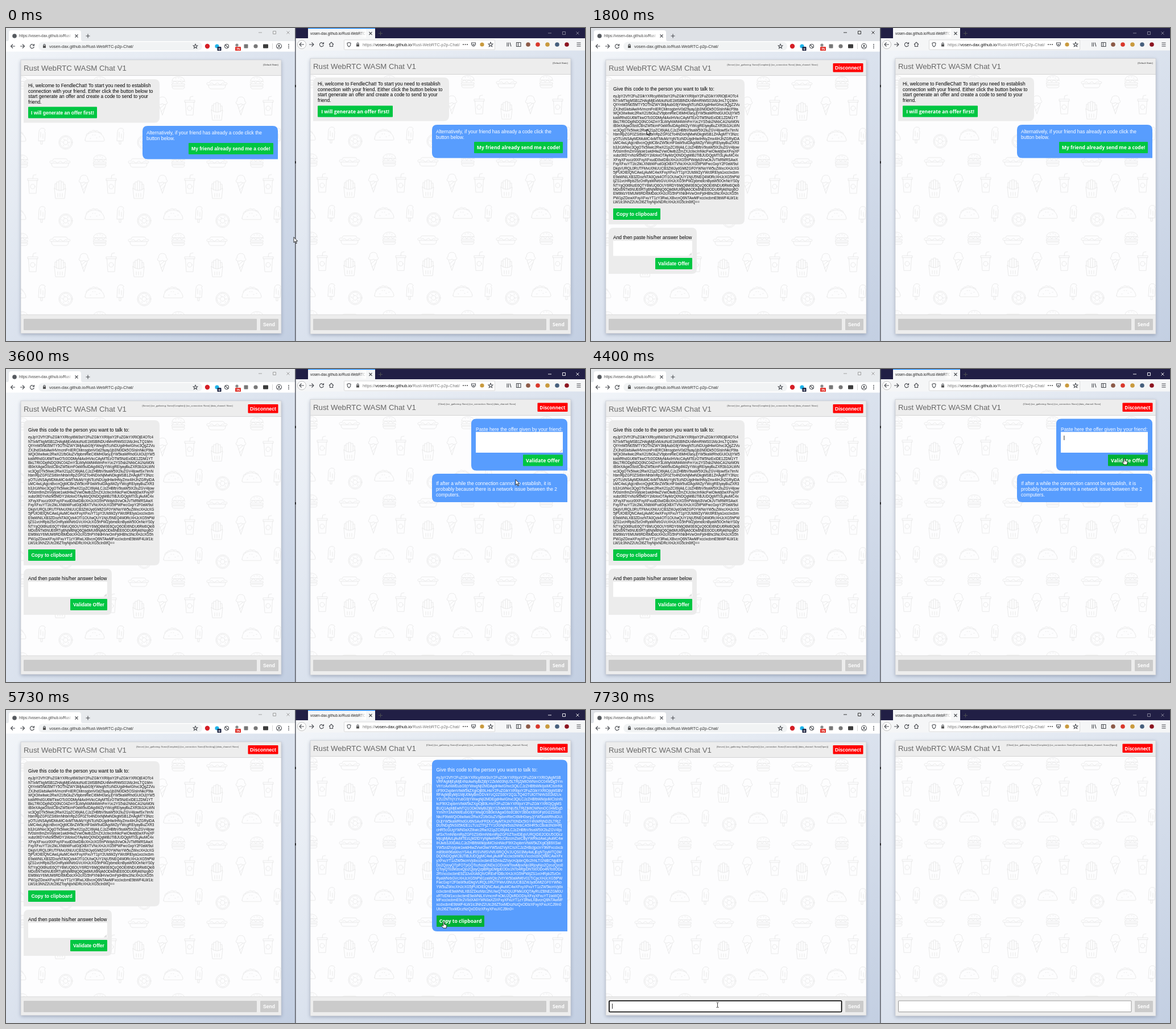
Animation of 1018x550 px, one loop 8000 ms. Source, as an HTML page:

```html
<!DOCTYPE html>
<html lang="en">
<head>
<meta charset="utf-8">
<title>Two browser chat</title>
<style>
html, body { margin: 0; width: 100%; height: 100%; overflow: hidden; background: #fff; }
svg { display: block; width: 1018px; height: 550px; }
text { font-family: "Liberation Sans", Arial, sans-serif; white-space: pre; }
.b { font-weight: 700; }
.fx { font-family: "Open Sans", "Noto Sans", sans-serif; font-weight: 700; }
.mono { font-family: "Liberation Mono", "DejaVu Sans Mono", monospace; }
.food { fill: none; stroke: #e7e7e7; stroke-width: .9; stroke-linejoin: round; stroke-linecap: round; }
.ico { fill: none; stroke: #4a4d52; stroke-width: 1.1; }
</style>
</head>
<body>
<svg id="stage" viewBox="0 0 1018 550" xmlns="http://www.w3.org/2000/svg">
<defs>
  <linearGradient id="page" x1="0" y1="0" x2="1" y2="1">
    <stop offset="0" stop-color="#f2f5f9"/><stop offset="1" stop-color="#c3cfe2"/>
  </linearGradient>
  <linearGradient id="fade"><stop offset="0" stop-color="#fff" stop-opacity="0"/><stop offset="1" stop-color="#fff"/></linearGradient>
  <filter id="soft" x="-10%" y="-10%" width="120%" height="120%"><feGaussianBlur stdDeviation="3"/></filter>
  <g id="burger"><path d="M-11-3C-11-13 11-13 11-3zM-12-1q2 3 4 0t4 0 4 0 4 0 4 0 4 0M-11 2h22v3h-22zM-11 7h22q0 4-4 4H-7q-4 0-4-4zM-5-7h1M0-8h1M4-6h1"/></g>
  <g id="hotdog"><path d="M-14-3q-4-1-4 2t4 2H14q4 0 4-2t-4-2M-13-3q0-4 4-4H9q4 0 4 4M-15 1q0 7 5 7h20q5 0 5-7M-12-1q3-3 5 0t5 0 5 0 5 0 4 0"/></g>
  <g id="cup"><path d="M-9-7v-3H9v3zM-7.500-7l1.500 23H6L7.500-7M0-10l1-6 5-1"/><circle cy="4" r="4"/></g>
  <g id="fries"><path d="M-10-3L-8 15H8l2-18q-10 8-20 0zM-9-2v-9h3v11M-6-11v-3h4v15M-2-14v-2h4v17M2-14h4v14M6-10h3v8M-4 6v6M0 6v6M4 6v6"/></g>
  <g id="cone"><path d="M-8-4q-2-3 1-4 0-8 7-8t7 8q3 1 1 4-4 3-8 0-4 3-8 0zM-6-2L0 16 6-2M-4 4L3-2M-2 10L5 2"/></g>
  <g id="pop"><path d="M-6 8L-5-8q1-6 6-6 4 0 5 3-3 2 0 5L5 8zM-2 8v6h3v-6M-2-7v9M2-4v8"/></g>
  <g id="taco"><path d="M-17 7C-16-12 14-13 17 7q0 2-2 2h-30q-2 0-2-2zM-15-1q0-4 4-4 1-4 5-3 3-4 7-1 4-2 6 2 5 0 5 4M-8 4h1M0-2h1M3 3h1M8 1h1M-4-2h1"/></g>
  <g id="donut"><circle r="12"/><circle r="10"/><circle r="4"/><path d="M-7-2l1 2M-4-6l2 1M3-7l1 2M7-1l-1 2M4 6l1-2M-3 6l-2-1"/></g>
</defs>
</svg>
<script>
const NS = "http://www.w3.org/2000/svg";
const stage = document.getElementById("stage");
const GREEN = "#00c642", DARK = "#00b136", BLUE = "#589dfe", GREY = "#ececec";
const END = 8000;
const timed = [], buttons = [];

function el(tag, attrs, parent = stage, content) {
  const node = document.createElementNS(NS, tag);
  for (const k in attrs) node.setAttribute(k, attrs[k]);
  if (content !== undefined) node.textContent = content;
  parent.appendChild(node);
  return node;
}
const rect = (p, x, y, width, height, fill, more) => el("rect", { x, y, width, height, fill, ...more }, p);
const path = (p, d, more) => el("path", { d, ...more }, p);
const dot = (p, cx, cy, r, fill) => el("circle", { cx, cy, r, fill }, p);
const text = (p, x, y, s, size = 8.45, fill = "#000", more) =>
  el("text", { x, y, "font-size": size, fill, ...more }, p, s);
const icon = (p, d, more) => path(p, d, { class: "ico", ...more });

// A group that is visible only between two times.
function during(from, to, parent) {
  const g = el("g", {}, parent);
  timed.push([g, from, to]);
  return g;
}

function bubble(p, x, y, w, h, own) {
  const r = 9, [br, bl] = own ? [0, r] : [r, 0];
  path(p, `M${x + r} ${y}h${w - 2 * r}q${r} 0 ${r} ${r}v${h - r - br}q0 ${br} ${-br} ${br}h${br + bl - w}` +
    `q${-bl} 0 ${-bl} ${-bl}v${bl + r - h}q0 ${-r} ${r} ${-r}z`, { fill: own ? BLUE : GREY });
}

function paragraph(p, x, y, lines, step, size, fill) {
  lines.forEach((s, i) => text(p, x, y + i * step, s, size, fill));
}

function button(p, x, y, w, label, fox) {
  const box = rect(p, x, y, w, 20, GREEN, { rx: 1 });
  label = text(p, x + w / 2, y + 13, label, fox ? 8.6 : 8.5, "#fff", { class: fox ? "fx" : "b", "text-anchor": "middle" });
  buttons.push({ box, p, x, y, w });
}

function focusRing(p, x, y, w, h) {
  rect(p, x, y, w, h, "none", { stroke: "#000", "stroke-width": 1.6, rx: 1.5 });
}

// ---- session codes ----
const ruler = document.createElement("canvas").getContext("2d");
ruler.font = '63.8px "Liberation Sans", Arial, sans-serif';

function wrap(s, width) {
  const lines = [""];
  for (const c of s) {
    if (ruler.measureText(lines[lines.length - 1] + c).width > width * 10) lines.push("");
    lines[lines.length - 1] += c;
  }
  return lines;
}

let seed = 5;
const rnd = n => (seed = (seed * 16807) % 2147483647) % n;
const hex = (n, set = "0123456789ABCDEF") => Array.from({ length: n }, () => set[rnd(16)]).join("");
const finger = () => Array.from({ length: 32 }, () => hex(2)).join(":");

// "@" in the session is padded so that the code ends with the wanted number of "=" signs.
function sessionCode(type, candidates, sdp, rest) {
  const ice = candidates.map(c => ({ candidate: "candidate:" + c, sdp_mid: "0", sdp_m_line_index: 0 }));
  const raw = JSON.stringify({ ice_candidates: ice, [type]: JSON.stringify({ type, sdp: sdp.join("\r\n") + "\r\n" }) });
  const pad = (rest - raw.length + 1 + 3000) % 3 + 3;
  return btoa(raw.replace("@", "4".repeat(pad)));
}

function codeLines(code, count, tail) {
  const body = code.replace(/=/g, "");
  return [...wrap(body + body, 223).slice(0, count - 1), code.slice(-tail)];
}

const gen = " generation 0 ufrag DB2k network-cost 999";
const offer = sessionCode("offer", [
  "1897852119 1 udp 2113937151 e4582da1-532f-452d-bc96-916998bef720.local 57345 typ host" + gen,
  "1909748326 1 udp 2113939711 15d35a0d-4e88-4444-8ff7-b25c82afc76a.local 57346 typ host" + gen,
  "842163049 1 udp 1677729535 203.0.113.36 57345 typ srflx raddr 0.0.0.0 rport 0" + gen
], ["v=0", "o=- 617390653919023@ 2 IN IP4 127.0.0.1", "s=-", "t=0 0", "a=group:BUNDLE 0", "a=msid-semantic: WMS",
  "m=application 9 UDP/DTLS/SCTP webrtc-datachannel", "c=IN IP4 0.0.0.0", "a=ice-ufrag:DB2k",
  "a=ice-pwd:" + hex(24), "a=ice-options:trickle", "a=fingerprint:sha-256 " + finger(), "a=setup:actpass", "a=mid:0",
  "a=sctp-port:5000", "a=max-message-size:262144"], 1);

const hostA = " bf0ccfd2-4659-4cf3-9cf8-8089beac015a.local ", hostB = " f85dc46e-4cd5-4895-93a5-53e1ce658cc6.local ";
const answer = sessionCode("answer", [
  "0 1 UDP 2122187007" + hostA + "62600 typ host",
  "2 1 UDP 2122252543" + hostB + "62601 typ host",
  "4 1 TCP 2105458943" + hostA + "9 typ host tcptype active",
  "5 1 TCP 2105524479" + hostB + "9 typ host tcptype active",
  "1 1 UDP 1685987327 203.0.113.36 62600 typ srflx raddr 0.0.0.0 rport 0"
], ["v=0", "o=mozilla...THIS_IS_SDPARTA-73.0.1 58214704@ 0 IN IP4 0.0.0.0", "s=-", "t=0 0", "a=sendrecv",
  "a=fingerprint:sha-256 " + finger(), "a=group:BUNDLE 0", "a=ice-options:trickle", "a=msid-semantic:WMS *",
  "m=application 9 UDP/DTLS/SCTP webrtc-datachannel", "c=IN IP4 0.0.0.0", "a=sendrecv", "a=ice-pwd:" + hex(32),
  "a=ice-ufrag:" + hex(8), "a=mid:0", "a=setup:active", "a=sctp-port:5000", "a=max-message-size:1073741823"], 2);

// ---- windows ----
const SITE = "vosen-dax.github.io", ROUTE = "/Rust-WebRTC-p2p-Chat/";

function windowKeys(p, xs, y, color) {
  const [a, b, c] = xs;
  path(p, `M${a - 3} ${y}h6M${b - 2.5} ${y - 2.5}h5v5h-5zM${c - 2.5} ${y - 2.5}l5 5m0-5l-5 5`,
    { fill: "none", stroke: color, "stroke-width": .9 });
}

function leftWindow() {
  const g = el("g");
  rect(g, 0, 0, 509, 24, "#e7eaed");
  const active = [[1600, 3400], [6270, END]], idle = [[0, 1600], [3400, 6270]];
  for (const [a, b] of active) {
    const s = during(a, b, g);
    rect(s, 0, 0, 509, 24, "#dee1e6");
    windowKeys(s, [447, 472, 496], 8, "#222");
  }
  for (const [a, b] of idle) windowKeys(during(a, b, g), [447, 472, 496], 8, "#999");
  path(g, "M1 23.500q4 0 4-4V8q0-4 4-4h119q4 0 4 4v11.500q0 4 4 4z", { fill: "#fff" });
  dot(g, 15, 14, 3.8, "#55595e");
  text(g, 23, 16.300, "https://" + SITE + "/Rust", 6.5, "#444");
  rect(g, 104, 8, 13, 12, "url(#fade)");
  rect(g, 117, 8, 4, 12, "#fff");
  icon(g, "M121.500 11.500l5 5m0-5l-5 5M140.500 14h7M144 10.500v7");
  rect(g, 0, 23, 509, 19, "#fff");
  rect(g, 57, 24.500, 288, 15, "#f1f3f4", { rx: 7.5 });
  icon(g, "M16 32H9M12 28.500L8.500 32l3.500 3.500M49 30.500a3.500 3.500 0 1 0 .3 2.500M49.500 28v3h-3");
  icon(g, "M25 32h7M29 28.500l3.500 3.500-3.500 3.500", { stroke: "#bbb" });
  rect(g, 65, 31, 5, 4, "#555");
  icon(g, "M66 31v-1.500q1.500-2 3 0V31", { "stroke-width": .8 });
  text(g, 76, 34.800, SITE + ROUTE, 7.35, "#333");
  icon(g, "M333 28.300l1.100 2.500 2.700.2-2.100 1.800.7 2.700-2.400-1.500-2.400 1.500.7-2.700-2.100-1.800 2.700-.2z", { "stroke-width": .8 });
  dot(g, 354, 32, 4.2, "#d51f26");
  dot(g, 371, 32, 3.6, "#1fb4ea");
  rect(g, 371.500, 33, 7, 7, "#1d2340", { rx: 1 });
  text(g, 373.500, 38.500, "0", 5.5, "#fff", { class: "b" });
  icon(g, "M391.500 32a3.500 3.500 0 1 1-7 0 3.500 3.500 0 1 1 7 0M385.500 29.500l5 5", { stroke: "#4c4f78" });
  dot(g, 406, 30, 2.6, "#888");
  rect(g, 403, 33, 10, 7, "#e0322b", { rx: 1 });
  text(g, 405, 38.500, "75", 5.5, "#fff", { class: "b" });
  rect(g, 418.500, 28.500, 7, 7, "#777", { rx: 1 });
  dot(g, 439, 32, 3.6, "#777");
  rect(g, 452, 28.500, 9, 7, "#3b3b3b", { rx: 1 });
  rect(g, 468, 27, .8, 10, "#ccc");
  icon(g, "M484.500 32a4.500 4.500 0 1 1-9 0 4.500 4.500 0 1 1 9 0M477 35q3-3 6 0");
  dot(g, 480, 31, 1.5, "#4a4d52");
  for (const y of [29, 32, 35]) dot(g, 497, y, .9, "#4a4d52");
  rect(g, 0, 41.500, 509, 508.500, "url(#page)");
}

function rightWindow() {
  const g = el("g");
  rect(g, 509, 0, 509, 19, "#211f45");
  rect(g, 531, 0, 118, 19, "#f5f6f7");
  for (const [a, b] of [[0, 1600], [3400, 6270]]) rect(during(a, b, g), 531, 0, 118, 1.2, "#0a84ff");
  for (const [a, b, c] of [[0, 3400, "#8b8a9c"], [3400, 6270, "#fff"], [6270, END, "#8b8a9c"]])
    windowKeys(during(a, b, g), [956, 981, 1005], 9, c);
  text(g, 535, 12, SITE + "/Rust-WebRTC", 6.3, "#222");
  rect(g, 620, 2, 13, 15, "url(#fade)");
  icon(g, "M638.500 7l5 5m0-5l-5 5");
  icon(g, "M655 9.500h7M658.500 6v7", { stroke: "#fff" });
  rect(g, 509, 18, 509, 22, "#f5f6f7");
  rect(g, 594.500, 21, 265, 17, "#fff", { stroke: "#ccc", "stroke-width": .7, rx: 1 });
  el("circle", { cx: 520, cy: 29, r: 7.5, fill: "#fff", stroke: "#aaa", "stroke-width": .7 }, g);
  icon(g, "M524 29h-7M519.500 25.500L516 29l3.500 3.500M533 29h8M537.500 25.500L541 29l-3.500 3.500M558 27.500a3.500 3.500 0 1 0 .3 2.500M558.500 25v3h-3" +
    "M568 29l4-4 4 4M569.500 28.500v4h5v-4");
  icon(g, "M603 25.500l3 1q0 5-3 6.500-3-1.500-3-6.500z", { "stroke-width": .9 });
  rect(g, 616, 28.500, 5, 4, "#555");
  icon(g, "M617 28.500V27q1.500-2 3 0v1.500", { "stroke-width": .8 });
  const url = text(g, 627, 31.800, "", 7.38, "#777");
  el("tspan", {}, url, "https://");
  el("tspan", { fill: "#111" }, url, SITE);
  el("tspan", {}, url, ROUTE);
  for (const x of [804, 807.500, 811]) dot(g, x, 29, 1, "#444");
  icon(g, "M818.500 26h7v3q-3.500 6-7 0zM820.500 28.500l1.500 1.500 1.500-1.500");
  dot(g, 837, 29, 3.6, "#c99a3e");
  icon(g, "M852 25l1.200 2.700 2.800.2-2.200 1.900.8 2.800-2.600-1.600-2.600 1.600.8-2.800-2.200-1.900 2.800-.2z", { "stroke-width": .9 });
  icon(g, "M881 25.500v7M883.500 25.500v7M886 25.500l2 7M897.500 25.500h7.500v7h-7.500zM900.500 25.500v7M1003.500 26h7M1003.500 29h7M1003.500 32h7");
  [[918, "#8c5a48"], [935, "#d9382c"], [952, "#c99a3e"], [969, "#465f7d"], [986, "#8c1420"]]
    .forEach(([x, c]) => dot(g, x, 29, 3.8, c));
  rect(g, 509, 39.500, 509, 510.500, "url(#page)");
  rect(g, 508, 0, 1.6, 550, "#5d6069");
  rect(g, 508, 100, 1.6, 4, "#111");
  rect(g, 508, 234, 1.6, 4, "#111");
}

function chatBox(x, y, bottom, bodyY) {
  const g = el("g"), fox = x > 500, id = fox ? "foodR" : "foodL";
  rect(g, x, y + 2, 458, bottom - y, "#56627a", { opacity: .45, filter: "url(#soft)" });
  rect(g, x, y, 458, bottom - y, "#fdfdfe");
  const tile = el("pattern", { id, x, y: bodyY, width: 138, height: 137.6, patternUnits: "userSpaceOnUse" }, g);
  const foods = { burger: [1, 12], hotdog: [69, 15], cup: [21, 53], cone: [111, 53], fries: [69, 63], pop: [37, 106], taco: [130, 106], donut: [79, 117] };
  for (const name in foods) {
    const [fx, fy] = foods[name];
    for (const dx of [-138, 0, 138]) el("use", { href: "#" + name, x: fx + dx, y: fy, class: "food" }, tile);
  }
  rect(g, x, bodyY, 458, 504 - bodyY, `url(#${id})`);
  rect(g, x, y, 458, bodyY - y - .5, "#ededed");
  rect(g, x, bodyY - 1, 458, .9, "#d2d2d2");
  rect(g, x, 503.500, 458, bottom - 503.500, "#ededed");
  rect(g, x, 503.500, 458, .8, "#d8d8d8");
  rect(g, x, y, 458, bottom - y, "none", { stroke: "#c9ccd2", "stroke-width": .7 });
  text(g, x + 5, y + 18.800, "Rust WebRTC WASM Chat V1", 13.25, "#666");
  rect(g, x + 5, 511, 410, 20, "#cbcbcb", { rx: 1 });
  rect(g, x + 421, 511, 32, 20, "#cbcbcb", { rx: 1 });
  text(g, x + 436.500, 524, "Send", 8.6, "#fff", { class: fox ? "fx" : "b", "text-anchor": "middle" });
  const open = during(7130, END, g);
  rect(open, x + 5.500, 511, 409.500, 19.500, "#fff", { stroke: "#858585", "stroke-width": .8, rx: 1 });
  return g;
}

function header(g, x, y, start, states) {
  text(during(0, start, g), x + 453, y + 9.500, "(Default State)", 4.2, "#333", { "text-anchor": "end" });
  states.forEach(([from, to, role, gather, link, data]) =>
    text(during(from, to, g), x + 293, y + 9.500,
      `(${role}) (ice_gathering: ${gather}) (ice_connection: ${link}) (data_channel: ${data})`,
      4.08, "#444", { "text-anchor": "middle" }));
  const off = during(start, END, g);
  rect(off, x + 399.500, y + 6, 53, 15.500, "#f00", { rx: 1 });
  text(off, x + 426, y + 17, "Disconnect", x > 500 ? 8.2 : 8.5, "#fff",
    { class: x > 500 ? "fx" : "b", "text-anchor": "middle" });
}

function welcome(g, x, y, fox) {
  bubble(g, x, y, 239, 76.500, false);
  paragraph(g, x + 8, y + 14.200, ["Hi, welcome to FendleChat! To start you need to establish",
    "connection with your friend. Either click the button below to",
    "start generate an offer and create a code to send to your", "friend."], 9.6);
  button(g, x + 8, y + (fox ? 49.500 : 48.500), fox ? 132 : 121, "I will generate an offer first!", fox);
  const by = y + (fox ? 83 : 82);
  bubble(g, x + 209, by, 238, 58.500, true);
  paragraph(g, x + 216, by + 15.200, ["Alternatively, if your friend has already a code click the", "button below."], 9.6, 8.45, "#fff");
  const w = fox ? 156 : 149;
  button(g, x + 439 - w, by + 30, w, "My friend already send me a code!", fox);
}

function textArea(g, x, y, w, h) {
  rect(g, x, y, w, h, "#fff");
  path(g, `M${x + w - 5} ${y + h - 1}l4-4M${x + w - 2.500} ${y + h - 1}l1.500-1.500`, { stroke: "#888", "stroke-width": .7 });
}

function pasted(g, x, y, w, h, code, tail, per, id) {
  rect(el("clipPath", { id }, g), x, y, w, h);
  const inner = el("g", { "clip-path": `url(#${id})` }, g);
  let end = code.length, n = tail;
  for (let ly = y + h - 2; ly > y - 2; ly -= 7.7) {
    text(inner, x + 5, ly, code.slice(end - n, end), 6.35, "#000", { class: "mono" });
    end -= n;
    n = per;
  }
  rect(g, x + w - 9, y, 9, h, "#f1f1f1");
  path(g, `M${x + w - 6.500} ${y + 6}l2-2.500 2 2.500zM${x + w - 6.500} ${y + h - 14}l2 2.500 2-2.500z`, { fill: "#333" });
  rect(g, x + w - 9, y + h - 9, 9, 9, "#ccc");
}

function leftChat() {
  const g = chatBox(26, 56, 536.500, 84);
  header(g, 26, 56, 1730, [
    [1730, 4800, "Server", "Some(Complete)", "None", "None"],
    [4800, 7130, "Server", "Some(Complete)", "Some(Checking)", "None"],
    [7130, END, "Server", "Some(Complete)", "Some(Connected)", "Some(Open)"]]);
  const first = during(0, 1730, g);
  welcome(first, 31, 90, false);
  focusRing(during(1530, 1730, first), 39, 138.500, 121, 20);

  const share = during(1730, 7130, g);
  bubble(share, 31, 90, 239, 255, false);
  text(share, 39, 110, "Give this code to the person you want to talk to:");
  paragraph(share, 39, 122.300, codeLines(offer, 26, 44), 7.44, 6.38, "#111");
  button(share, 39, 317, 83, "Copy to clipboard");
  bubble(share, 31, 351, 155, 81, false);
  text(share, 39, 371, "And then paste his/her answer below");
  textArea(share, 39, 374, 139, 26.500);
  pasted(during(6470, 7130, share), 39, 374, 139, 26.500, answer, 9, 31, "clipL");
  button(share, 113, 404, 65, "Validate Offer");
  focusRing(during(6930, 7130, share), 113, 404, 65.500, 20);

  const typing = during(7730, END, g);
  focusRing(typing, 32, 511, 408.500, 19.500);
  rect(typing, 37, 516, .8, 9, "#000");
}

function rightChat() {
  const g = chatBox(535, 53.500, 537.500, 82);
  header(g, 535, 53.500, 3470, [
    [3470, 4670, "Client", "None", "None", "None"],
    [4670, 7130, "Client", "Some(Complete)", "Some(Checking)", "None"],
    [7130, END, "Client", "Some(Complete)", "Some(Connected)", "Some(Open)"]]);
  welcome(during(0, 3470, g), 540, 87, true);

  const ask = during(3470, 4670, g);
  bubble(ask, 818, 87.500, 169, 91, true);
  text(ask, 826, 108.500, "Paste here the offer given by your friend:", 8.45, "#fff");
  textArea(ask, 826, 110.500, 153, 36.500);
  rect(during(4130, 4470, ask), 831.500, 117, .8, 8, "#000");
  pasted(during(4470, 4670, ask), 826, 110.500, 153, 36.500, offer, 20, 35, "clipR");
  button(ask, 909, 150.500, 70, "Validate Offer", true);
  bubble(ask, 749, 184, 238, 50, true);
  paragraph(ask, 756, 204, ["If after a while the connection cannot be establish, it is",
    "probably because there is a network issue between the 2", "computers."], 9.8, 8.45, "#fff");

  const reply = during(4670, 7130, g);
  bubble(reply, 749, 87.500, 238, 301.500, true);
  text(reply, 756.500, 108.300, "Give this code to the person you want to talk to:", 8.45, "#fff");
  paragraph(reply, 756.500, 120.600, codeLines(answer, 31, 38), 7.7, 6.38, "#fff");
  button(reply, 757, 361, 84, "Copy to clipboard", true);
}

leftWindow();
rightWindow();
leftChat();
rightChat();

// ---- pointer ----
const pointer = el("g");
const ink = { fill: "#fff", stroke: "#000", "stroke-width": .8, "stroke-linejoin": "round" };
const shapes = {
  arrow: path(pointer, "M0 0v9.500l2.200-2 1.700 3.700 1.500-.7-1.700-3.500h3z", ink),
  hand: path(pointer, "M-1 1a1 1 0 0 1 2 0v3.500l3.300.8q1 .3.800 1.500l-.6 4.200h-5.300l-3.200-3.800q0-1.600 1.500-.9l1.500 1z", ink),
  beam: path(pointer, "M-2-4h1.500l.5.500.5-.5H2M0-3.500v7.500M-2 4.500h1.500l.5-.5.5.5H2", { fill: "none", stroke: "#111", "stroke-width": .8 })
};

// time, x, y
const route = [
  [0, 506, 367.500], [69, 506, 367.500], [70, 488, 358], [270, 488, 358], [930, 68, 150], [1130, 148, 150], [1270, 101, 156.500],
  [1730, 101, 156.500], [2270, 80, 324], [2400, 80, 324], [2800, 627, 265], [2940, 627, 265], [3000, 685, 244],
  [3330, 896, 206], [3500, 896, 206], [3800, 896, 171], [4070, 842, 126], [4200, 842, 126], [4400, 938, 157],
  [5000, 938, 157], [5070, 938, 162], [5470, 797, 371], [5730, 797, 371], [5930, 252, 395], [6200, 110, 388],
  [6470, 110, 388], [6730, 149, 414], [6940, 149, 414], [7400, 222.500, 518], [END, 222.500, 518]
];
// x, y, width, height, from, to of the text fields
const fields = [[826, 110, 153, 37, 3470, 4670], [39, 374, 130, 26, 1730, 7130], [31, 511, 410, 20, 7130, END]];
const inside = (x, y, bx, by, w, h) => x >= bx && x <= bx + w && y >= by && y <= by + h;

function place(t) {
  const i = Math.max(1, route.findIndex(k => k[0] >= t));
  const [a, ax, ay] = route[i - 1], [b, bx, by] = route[i];
  const u = (t - a) / (b - a);
  return [ax + (bx - ax) * u, ay + (by - ay) * u];
}

function draw(time) {
  const t = Math.min(END - 1, Math.ceil(Math.floor((time + 4) * .015) * 20 / 3) * 10);
  for (const [g, from, to] of timed) g.style.display = t >= from && t < to ? "" : "none";
  const [x, y] = place(t);
  let kind = "arrow";
  for (const b of buttons) {
    const over = b.p.style.display !== "none" && inside(x, y, b.x, b.y, b.w, 20);
    if (over) kind = "hand";
    b.box.setAttribute("fill", over && t >= 1530 ? DARK : GREEN);
  }
  for (const [fx, fy, w, h, from, to] of fields)
    if (t >= from && t < to && inside(x, y, fx, fy, w, h)) kind = "beam";
  for (const k in shapes) shapes[k].style.display = k === kind ? "" : "none";
  pointer.setAttribute("transform", `translate(${x} ${y})`);
}

const begin = performance.now();
function tick() {
  draw((performance.now() - begin) % END);
  requestAnimationFrame(tick);
}
tick();
</script>
</body>
</html>
```
